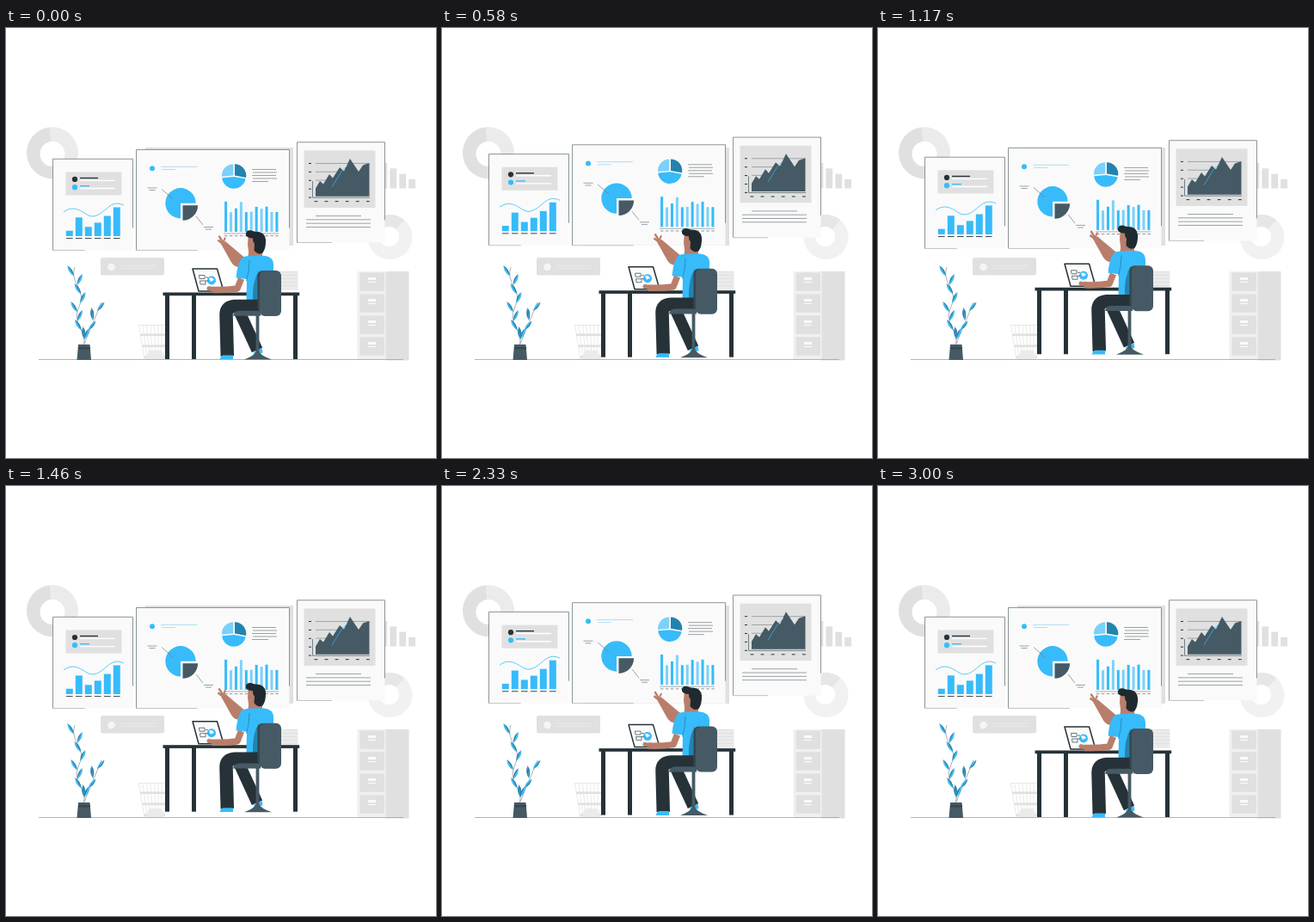
An HTML page that plays this animation: 500 by 500 pixels, repeating every 3040 ms.

```html
<!DOCTYPE html>
<html lang="en">
<head>
<meta charset="utf-8">
<title>Analyst at work</title>
<style>
html, body { margin: 0; width: 100%; height: 100%; overflow: hidden; background: #fff; }
svg { display: block; width: 100%; height: 100%; }
</style>
</head>
<body>
<svg id="stage" viewBox="0 0 500 500" fill="none"></svg>
<script>
const BLUE = '#37bbfa', LIGHT = '#7bd1fa', DEEP = '#2383ae';
const DARK = '#263238', SLATE = '#455a64', SHADE = '#37474f', SKIN = '#b97e6b';
const GREY = '#e0e0e0', PALE = '#ebebeb', PAPER = '#fafafa', INK = '#6f7b81';

const { PI, sin, cos, exp, max } = Math;

const rect = (x, y, w, h, fill, extra = '') =>
  `<rect x="${x}" y="${y}" width="${w}" height="${h}" fill="${fill}" ${extra}/>`;
const dot = (x, y, r, fill) => `<circle cx="${x}" cy="${y}" r="${r}" fill="${fill}"/>`;
const shape = (d, fill) => `<path d="${d}" fill="${fill}"/>`;
const line = (d, color, width = 0.7, extra = '') =>
  `<path d="${d}" stroke="${color}" stroke-width="${width}" ${extra}/>`;
const limb = (d, color, width) => line(d, color, width, 'stroke-linejoin="round"');
const finger = (d, width) => line(d, SKIN, width, 'stroke-linecap="round"');
const row = (x, y, w, color, width) => line(`M${x} ${y}h${w}`, color, width);
const repeat = (n, draw) => Array.from({ length: n }, (_, i) => draw(i)).join('');
const bars = (n, x, step, w, bottom, height, color) =>
  repeat(n, i => rect(x + i * step, bottom - height(i), w, height(i), color(i)));

// Pie slice between two angles in degrees, clockwise from the top.
function slice(cx, cy, r, from, to, fill) {
  const at = a => `${cx + r * sin(a * PI / 180)} ${cy - r * cos(a * PI / 180)}`;
  return shape(`M${cx} ${cy}L${at(from)}A${r} ${r} 0 ${+(to - from > 180)} 1 ${at(to)}Z`, fill);
}

// A slender leaf with one darker half.
function leaf(x, y, dx, dy, left, right) {
  const half = (side, fill) =>
    shape(`M${x} ${y}q${dx / 2 - dy * side} ${dy / 2 + dx * side} ${dx} ${dy}Z`, fill);
  return half(-0.27, left) + half(0.27, right);
}

function plant() {
  const stemX = y => 84.5 + (y - 320) * 0.07 + 3.5 * cos(2 * PI * (y - 362) / 50);
  const stem = 'M' + Array.from({ length: 31 }, (_, i) => `${stemX(368 - i * 3)} ${368 - i * 3}`).join('L');
  const mainLeaves = repeat(8, i => {
    const y = 362 - i * 10.5;
    return i % 2 ? leaf(stemX(y), y, -7.5, -12.5, BLUE, DEEP) : leaf(stemX(y), y, 6, -13, DEEP, BLUE);
  });
  const sideLeaves = repeat(4, i => {
    const x = 91 + i * 5, y = 362 - i * 11;
    return i % 2 ? leaf(x, y, 8.5, -10.5, BLUE, DEEP) : leaf(x, y, -1.5, -15, DEEP, DEEP);
  });
  return line(stem, INK, 0.6) + line('M91 367L111 319', INK, 0.6) + mainLeaves + sideLeaves +
    shape('M84 368H97.5L99 386H82.5Z', SLATE) + rect(84, 371, 14, 2.5, SHADE);
}

function basket() {
  return repeat(8, i => line(`M${154.5 + i * 4.5} 345.5L${161 + i * 3.2} 385`, GREY)) +
    row(154, 345.5, 33, GREY) +
    repeat(3, i => rect(156 + i * 2.5, 355.5 + i * 13, 30 - i * 3, 2.6, GREY)) +
    shape('M163 385L166 375H181L184 385Z', PALE);
}

function cabinet() {
  return rect(408.5, 283, 33, 103, '#f0f0f0') + rect(441.5, 283, 27, 103.5, GREY) +
    repeat(4, i => {
      const y = 284.5 + i * 25;
      return rect(411.5, y, 28.5, 21.3, GREY) + rect(421, y + 5.5, 9, 3, PAPER) +
        row(421, y + 11, 9, PAPER, 1.2);
    });
}

function room() {
  return slice(54, 145.2, 30, 174, 354, GREY) + slice(54, 145.2, 30, -6, 174, PALE) +
    dot(54, 146.5, 14.5, '#fff') + rect(162, 139, 172, 114, GREY) +
    bars(4, 435.5, 10.9, 7.8, 186.5, i => 29.5 - i * 6.3, () => GREY) +
    dot(446.5, 243, 26, '#f1f1f1') + slice(446.5, 243, 26, -60, 40, '#e6e6e6') +
    dot(445.5, 242.5, 11.5, '#fff') +
    rect(110, 267, 74, 20.5, GREY, 'rx="2"') + dot(122.5, 278, 4.3, '#f5f5f5') +
    repeat(2, i => row(133, 276 + i * 3.5, 41, PALE, 0.8)) +
    rect(318, 283, 21.5, 22, PALE) + repeat(5, i => row(318, 283.5 + i * 4, 21, GREY, 1)) +
    basket() + cabinet() + row(38, 385.5, 424, '#a0a5a8', 0.8) + plant();
}

const board = (x, y, w, h) => rect(x, y, w, h, PAPER) +
  line(`M${x + w} ${y + h - 26}V${y}H${x}V${y + h}`, INK, 0.8) +
  row(x, y + h, w * 0.4, '#a5aaad');

function leftBoard() {
  const height = i => 5.5 + 1.12 * i * i + 15 * exp(-3 * (i - 1) ** 2);
  const legend = (y, color, w) => dot(80, y, 3.1, color) + row(86, y - 1.5, w, color, 1.4) +
    row(86, y + 1.4, 41, '#fff', 1.4);
  return board(54.5, 152.3, 93, 106.2) + rect(69.5, 167.5, 65, 27, GREY) +
    legend(176, DARK, 21) + legend(185.2, BLUE, 11) +
    line('M67 214C78 206 86 212 94 217S109 217 117 210S130 203 137 206', BLUE, 0.8) +
    bars(6, 69.8, 11, 8, 242, height, () => BLUE) +
    repeat(6, i => row(70 + i * 11, 244.6, 7.6, DARK, 0.9));
}

function mainBoard() {
  const height = i => 26.6 + 4.1 * cos(2.25 * i) - 4.3 * sin(PI * i / 2) + 1.5 * max(0, 3 - i);
  const note = (x, y) => row(x, y, 11, INK) + row(x + 2, y + 2.6, 7, INK);
  return board(151.5, 141.5, 178, 117) + dot(170, 163.2, 3, BLUE) +
    row(180, 161.4, 42, '#8fd3f5') + row(181, 164.5, 16, '#8fd3f5') +
    slice(203, 203.8, 17.7, 180, 450, BLUE) + slice(205.5, 206.2, 17.6, 90, 180, SLATE) +
    line('M194 199L181 187.5M221 219L229 229', INK) + note(164.5, 186) + note(230, 231.5) +
    slice(265, 173, 13.8, 100, 265, BLUE) + slice(264.3, 171.6, 13.3, 265, 360, LIGHT) +
    slice(266, 171.6, 13.3, 0, 100, DEEP) +
    repeat(5, i => row(286 + i % 2, 164.5 + i * 3.5, i < 4 ? 28 : 19, INK)) +
    bars(11, 254.1, 5.93, 3, 237, height, i => i % 2 ? LIGHT : BLUE) +
    row(253, 239, 64, INK, 0.6) + repeat(11, i => row(254 + i * 5.93, 241.7, 3.5, INK, 0.8));
}

function rightBoard() {
  return board(338.5, 132.8, 102, 116.7) + rect(346.5, 142.5, 83, 66.5, GREY) +
    repeat(3, i => row(360, 157.5 + i * 9.8, 62, INK, 0.6)) +
    shape('M360 195.7V186.5L365 178L369 181.5L376 170L380 174.5L388 162L393 166.5L400 152L410 167L415 159.5L422.5 157V195.7Z', SLATE) +
    line('M379 185L390 167L397 160', BLUE) +
    line('M356.5 178V197.2H423', SLATE) +
    repeat(5, i => row(352, 157.5 + i * 9.9, 3, DARK, 1)) +
    repeat(6, i => row(358.5 + i * 12.1, 201.7, 3.8, DARK, 1)) +
    repeat(4, i => row(i ? 349 : 360, 218.6 + i * 4.3, i ? 75 : 53, INK));
}

function desk() {
  return repeat(3, i => rect([185, 216, 334][i], 309, 5, 76, DARK)) +
    rect(182.5, 307.5, 158.7, 3.7, DARK);
}

function laptop() {
  return shape('M217 280H245.5L253 306H224Z', PAPER) +
    limb('M217 280H245.5L253 306H224Z', DARK, 1.5) + dot(239, 293.5, 5, BLUE) +
    repeat(2, i => limb(`M${224.5 + i} ${287.5 + i * 6.5}h6.5v4h-6zM232 ${290 + i * 4}h3`, SLATE, 0.8)) +
    shape('M236 291Q240 289 242 293L238 295Z', PAPER);
}

function person() {
  return limb('M272 331L292 374.5', DARK, 13.5) +
    shape('M288 377L297.5 372L298.5 377.5L289 381Z', BLUE) +
    // raised arm
    shape('M250 251L262 272.5Q266 279 274 278L277 266.5L255 248Z', SKIN) +
    finger('M252 249L248 242.5', 2.4) + finger('M253 248L254.8 244.3', 2) +
    finger('M251 250L247.3 247.3', 2.6) +
    shape('M283 256H298V268H281Z', SKIN) +
    // shirt
    shape('M275 266.5Q284 264 300 264.8Q311 266 311 275V318H279.5L280 292L267.5 290.5Q269 273 275 266.5Z', BLUE) +
    shape('M294 282Q286 295 287 318H295Z', DEEP) +
    line('M283 270Q283 284 279.5 294', DEEP, 0.8) +
    // typing arm
    limb('M273.5 291.5L269 303Q256 305 240 304.5', SKIN, 7.5) + finger('M242 304L236 302.8', 5) +
    // head
    shape('M281.5 244Q290 241 297 247L296 260Q288 266 282.3 261.5L281 252Z', SKIN) +
    shape('M279 241Q278 235 284.5 235.2L289.5 236.8Q301 236.5 302 246Q302.5 256 298.5 261.5Q293 264.5 288.5 258.5L289 251Q286.5 248 287 244.5Q281 244.5 279 241Z', '#1f2a30') +
    dot(286.3, 251, 2, SKIN) +
    // near leg
    limb('M294 323.5H266Q256 324 256 333L257.3 381.5', DARK, 15.5) +
    shape('M252 380.5H264V385.3H248.5Q249 382.7 252 380.5Z', BLUE);
}

function chair() {
  return rect(290.6, 333, 3.8, 45, SLATE) +
    shape('M277 385.5Q289 381 291 376H294Q296 381 309 385.5Z', SLATE) +
    shape('M264 334.8Q264.5 328.7 271 328.7H296V334.8Z', SLATE) +
    rect(292.5, 282, 12, 49, SHADE, 'rx="6"') + rect(295, 282, 25, 53, SLATE, 'rx="6"');
}

const stage = document.getElementById('stage');
stage.innerHTML = room() +
  `<g id="boards">${leftBoard()}${mainBoard()}${rightBoard()}</g>` +
  `<g id="worker">${desk()}${laptop()}${person()}${chair()}</g>`;

const boards = document.getElementById('boards');
const worker = document.getElementById('worker');
const LOOP = 3040, LEAD = 35;
const lift = (t, period, height) => -height * (1 - cos(2 * PI * t / period)) / 2;
const place = (node, y) => node.setAttribute('transform', `translate(0 ${y.toFixed(3)})`);

function draw(t) {
  place(boards, lift(t + LEAD, 1500, 6.2));
  place(worker, lift(t + LEAD, 3000, 6.3));
}

const start = performance.now();
function tick() {
  draw((performance.now() - start) % LOOP);
  requestAnimationFrame(tick);
}
tick();
</script>
</body>
</html>
```
